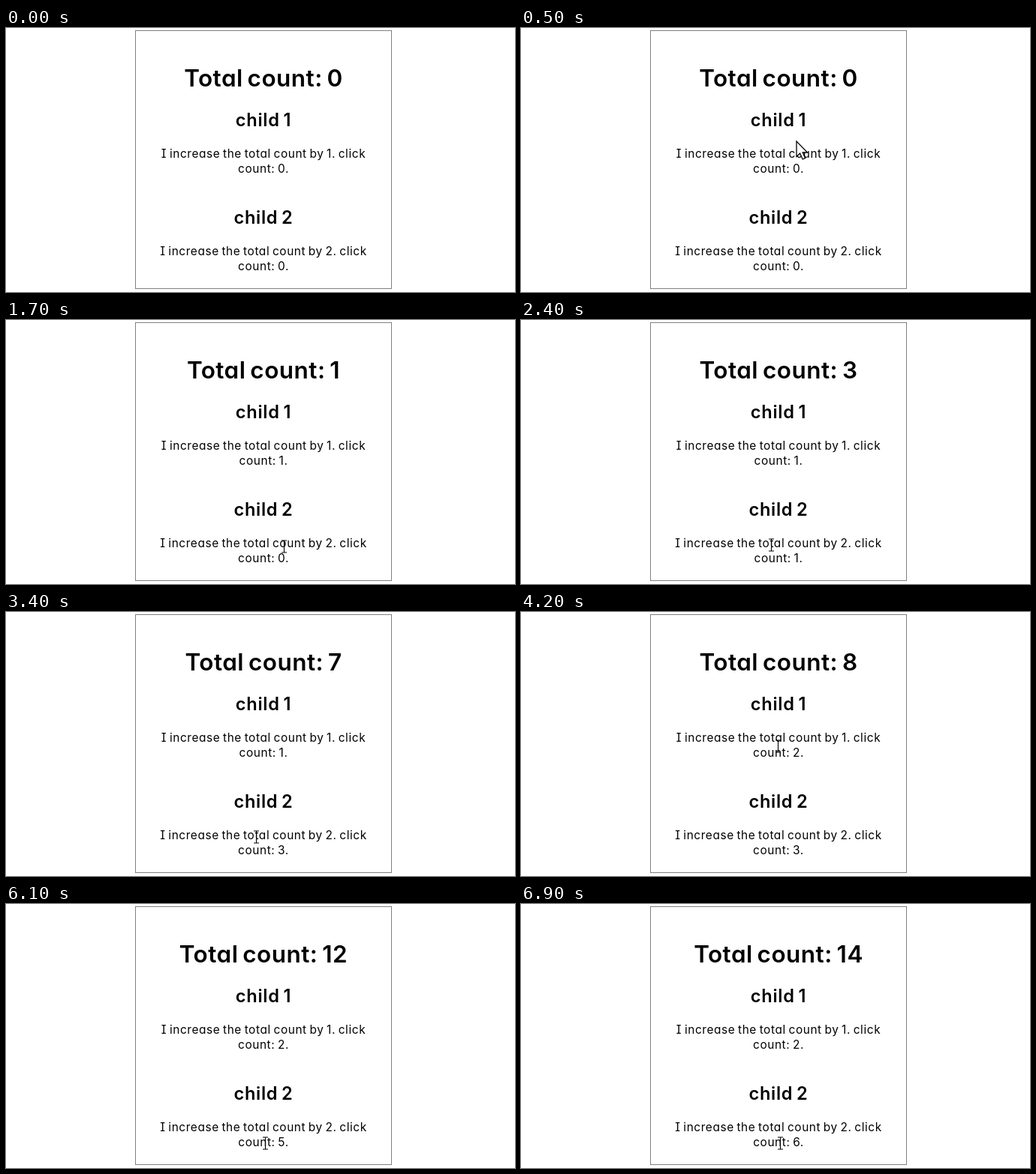
An HTML page for the animation above (7100 ms loop, 678 px wide and 352 px high).

```html
<!DOCTYPE html>
<html lang="en">
<head>
<meta charset="utf-8">
<title>Click counter</title>
<style>
  html, body { margin: 0; width: 100%; height: 100%; overflow: hidden; background: #fff; }
  svg { display: block; width: 678px; height: 352px; }
  text {
    font-family: Inter, "DejaVu Sans", sans-serif;
    font-feature-settings: "cv08", "cv11";
    text-anchor: middle;
    word-spacing: -0.08em;
    fill: #000;
  }
  .total { font-size: 31.5px; font-weight: 600; letter-spacing: 0.015em; }
  .name { font-size: 23.6px; font-weight: 600; letter-spacing: 0.03em; }
  .note { font-size: 15.4px; letter-spacing: 0.039em; }
</style>
</head>
<body>
<svg viewBox="0 0 678 352">
  <rect x="172.5" y="3.5" width="341" height="344" fill="#fff" stroke="#808080"/>
  <text class="total" id="total" x="343" y="78"></text>
  <g id="children"></g>
  <path id="arrow" d="M0 0V20.5L4.6 16.2 8.2 24 11.6 22.4 8.2 15H14.6Z"
        fill="#fff" stroke="#000" stroke-width="1.3"/>
  <path id="beam" d="M-3.5 -8H3.5M0 -8V8M-3.5 8H3.5" fill="none" stroke="#000" stroke-width="1.1"/>
</svg>
<script>
const LOOP = 7100, STEP = 100, ROW = 130, GLIDE = 500, ENTER = 100;
const $ = id => document.getElementById(id);

// Each click on child n adds n to the total.
const children = [
  { step: 1, clicks: [1000, 4100] },
  { step: 2, clicks: [2100, 2600, 3000, 4900, 5700, 6300] }
];

// The pointer glides to each pose, arriving at time t.
const poses = [
  { t: ENTER, x: 378, y: 228 },
  { t: 500, x: 367, y: 151 },
  { t: 800, x: 360, y: 178 },
  { t: 1700, x: 370.5, y: 302 },
  { t: 2100, x: 333.5, y: 300 },
  { t: 4100, x: 342.5, y: 179 },
  { t: 4700, x: 345.5, y: 319 }
];

function addText(cls, y, content) {
  const el = document.createElementNS("http://www.w3.org/2000/svg", "text");
  el.setAttribute("class", cls);
  el.setAttribute("x", 343);
  el.setAttribute("y", y);
  el.textContent = content;
  $("children").append(el);
  return el;
}

children.forEach((child, i) => {
  const top = i * ROW;
  addText("name", 131 + top, `child ${child.step}`);
  addText("note", 173 + top, `I increase the total count by ${child.step}. click`);
  child.counter = addText("note", 193 + top, "");
});

const smooth = p => p * p * (3 - 2 * p);

function pointerAt(t) {
  let { x, y } = poses[0];
  poses.slice(1).forEach((pose, i) => {
    const begin = Math.max(poses[i].t, pose.t - GLIDE);
    const p = Math.min(1, Math.max(0, (t - begin) / (pose.t - begin)));
    x += (pose.x - x) * smooth(p);
    y += (pose.y - y) * smooth(p);
  });
  return { x, y };
}

// Every row holds a heading, a gap and a two-line note.
function isOverText(y) {
  const local = (y - 108) % ROW;
  return local < 30 || (local >= 50 && local <= 90);
}

function show(id, visible, { x, y }) {
  $(id).setAttribute("visibility", visible ? "visible" : "hidden");
  $(id).setAttribute("transform", `translate(${x} ${y})`);
}

function draw(t) {
  let total = 0;
  for (const { step, clicks, counter } of children) {
    const count = clicks.filter(at => at <= t).length;
    counter.textContent = `count: ${count}.`;
    total += step * count;
  }
  $("total").textContent = `Total count: ${total}`;

  const pointer = pointerAt(t);
  const overText = isOverText(pointer.y);
  show("arrow", t >= ENTER && !overText, pointer);
  show("beam", t >= ENTER && overText, pointer);
}

const start = performance.now();
function tick() {
  const t = (performance.now() - start) % LOOP;
  draw(Math.floor(t / STEP) * STEP);
  requestAnimationFrame(tick);
}
tick();
</script>
</body>
</html>
```
